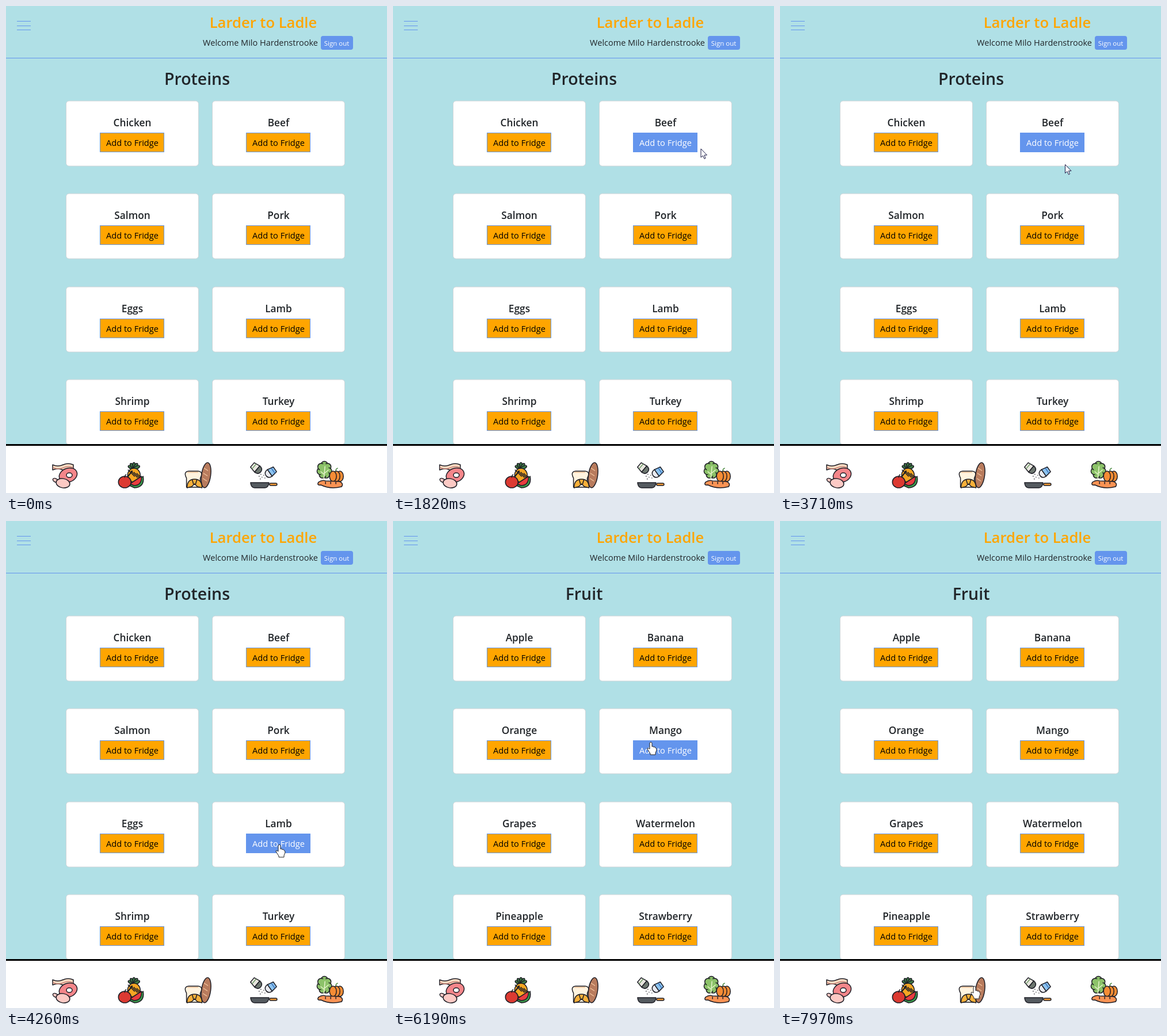
An HTML page for the animation above (8000 ms loop, 662x846 px).

```html
<!DOCTYPE html>
<html lang="en">
<head>
<meta charset="utf-8">
<title>Larder to Ladle</title>
<style>
  html, body { margin: 0; width: 100%; height: 100%; overflow: hidden; background: #b0e0e6; }
  svg { display: block; width: 100%; height: 100%; }
  text { font-family: "Open Sans", "Noto Sans", sans-serif; fill: #212529; }
  .mid { text-anchor: middle; }
  .bold { font-weight: 600; }
  #icons { stroke: #1d1d25; stroke-width: 1.5; stroke-linejoin: round; stroke-linecap: round; }
</style>
</head>
<body>
<svg viewBox="0 0 662 846">
  <rect width="662" height="846" fill="#b0e0e6"/>
  <path d="M19 26.5h24m-24 8h24m-24 7h24M0 90.5h662" stroke="#6495ed"/>
  <text class="mid bold" x="447" y="38" style="font-size:25.6px;fill:#ffa500">Larder to Ladle</text>
  <text x="542" y="69" text-anchor="end" font-size="14.5">Welcome Milo Hardenstrooke</text>
  <rect x="547" y="52" width="56" height="24" rx="4" fill="#6495ed"/>
  <text class="mid" x="574.5" y="68.5" style="font-size:11.5px;fill:#fff">Sign out</text>
  <text id="heading" class="mid bold" x="332" y="137" font-size="28.5"></text>
  <g id="cards"></g>
  <rect y="761" width="662" height="85" fill="#fff"/>
  <rect y="761" width="662" height="3"/>
  <g id="icons"></g>
  <g id="cursor" fill="#fff" stroke-linejoin="round">
    <path id="arrow" d="M.5 0V15l3.5-3 2.5 5.500 2-1-2-5.500H11z" stroke="#191945"/>
    <path id="hand" d="M-2 2q2-4 4 0v6q2-2 3 1 2-2 3 1 2 0 2 4l-2 5v3h-9v-2l-5-8q0-3 4 0z" stroke="#222"/>
  </g>
</svg>
<script>
const LOOP = 8000, SHOW = 390, CLICK = 5100, HOVER_LAG = 70;
const BLUE = "#6495ed", ORANGE = "#ffa500";
const pages = [
  ["Proteins", "Chicken", "Beef", "Salmon", "Pork", "Eggs", "Lamb", "Shrimp", "Turkey"],
  ["Fruit", "Apple", "Banana", "Orange", "Mango", "Grapes", "Watermelon", "Pineapple", "Strawberry"]
];

const $ = id => document.getElementById(id);
function add(parent, tag, attrs, text = "") {
  const el = document.createElementNS("http://www.w3.org/2000/svg", tag);
  for (const k in attrs) el.setAttribute(k, attrs[k]);
  el.textContent = text;
  return parent.appendChild(el);
}

// Cards: two columns, four rows.
const ROW = 161.5, COL = 254, BTN_W = 111, BTN_H = 33;
const cards = pages[0].slice(1).map((_, i) => {
  const left = 104.5 + (i % 2) * COL, top = 165 + Math.floor(Math.floor(i / 2) * ROW);
  const mid = left + 115, x = left + 59, y = top + 55.5, g = $("cards");
  add(g, "rect", { x: left, y: top, width: 230, height: 113, rx: 5, fill: "#fff", stroke: "#cfd5d8" });
  const name = add(g, "text", { class: "mid bold", x: mid, y: top + 43.5, "font-size": 17.3 });
  const box = add(g, "rect", { x, y, width: BTN_W, height: BTN_H, stroke: BLUE });
  const label = add(g, "text", { class: "mid", x: mid, y: y + 22, "font-size": 14.6 }, "Add to Fridge");
  return { name, box, label, x, y };
});

// Footer icons, drawn around their own centres.
const iconX = i => 102 + i * 115.3, ICON_Y = 815;
const group = (parent, x, y, turn = 0) =>
  add(parent, "g", { transform: `translate(${x} ${y}) rotate(${turn})` });
const line = (g, d, stroke = "#1d1d25") => add(g, "path", { d, fill: "none", stroke });
const shape = (g, d, fill) => add(g, "path", { d, fill });
const oval = (g, x, y, rx, ry, fill, turn = 0) =>
  add(group(g, x, y, turn), "ellipse", { rx, ry, fill });
const repeat = (n, draw) => Array.from({ length: n }, (_, i) => draw(i));

function meat(g) {
  shape(g, "M-21-18q9 4 18 0t18 0v9q-9 4-18 0t-18 0z", "#fbdcc3");
  line(g, "M-20-13q9 4 18 0t16 0", "#c98478");
  oval(g, 6, 0, 16, 12, "#f4868a", -20);
  oval(g, 8, 0, 5, 4, "#fff");
  oval(g, -16, 9, 5, 3, "#fcc9c4", 30);
  oval(g, -3, 14, 12, 8, "#fcc9c4", 10);
}

function fruit(g) {
  repeat(5, i => {
    const turn = (i - 2) * 32;
    oval(group(g, 5, -11, turn), 0, -5, 2.5, 6, "#3c7a45");
  });
  oval(g, 5, 0, 11, 12, "#f5a623");
  repeat(4, i => line(g, `M${i * 5 - 5} ${i * 2 - 9}l11 11m${-4 - i * 5} ${-9 - i * 2}l-9 11`));
  shape(g, "M21 2q3 19-15 20l-9-4z", "#3c9a4c");
  shape(g, "M18 2q1 16-13 16l-7-3z", "#e93c3f");
  oval(g, -11, 12, 11, 10, "#dc3a32");
  line(g, "M-11 4q0-3 2-5");
}

function bread(g) {
  oval(g, 15, 0, 8, 22, "#b87b5d", 8);
  repeat(3, i => line(g, `M${12 - i} ${i * 9 - 12}l6 4`, "#f0c19b"));
  shape(g, "M-19 21V5q-6-11 4-12h16q10 1 4 12v16z", "#fff3df");
  line(g, "M-17-5h18", "#e7bc91");
  shape(g, "M-18 22q0-15 13-15t13 15l-8-2-5-5-5 5z", "#f8b03a");
  line(g, "M-9 8l2 7m4 0l2-7");
}

function shaker(g, x, y, turn, glass, band, base) {
  const s = group(g, x, y, turn);
  shape(s, "M-5-9H5L7 2H-7z", glass);
  shape(s, "M-7 2H7q0 8-7 8t-7-8z", base);
  line(s, "M-5-5H5", band);
}

function seasoning(g) {
  shaker(g, -13, -12, -50, "#e8e6df", "#6d9b65", "#6d7770");
  shaker(g, 12, -5, 55, "#8cc3f0", "#3f77bd", "#e8eaf0");
  repeat(7, i => line(g, `M${-10 + i * 5 % 13} ${i * 1.6 - 3}v.1`));
  shape(g, "M-23 13H9q-1 9-7 9h-18q-6 0-7-9z", "#555b60");
  add(g, "rect", { x: 10, y: 14, width: 13, height: 4, rx: 2, fill: "#f39a35" });
}

function veg(g) {
  repeat(7, i => {
    const a = i / 7 * 2 * Math.PI;
    oval(g, -10 + 7 * Math.sin(a), -9 - 9 * Math.cos(a), 6, 6, "#8cc269");
  });
  add(g, "ellipse", { cx: -10, cy: -9, rx: 8, ry: 11, fill: "#8cc269", stroke: "none" });
  line(g, "M-11 7l2-22m-1 14l-6-5m7 2l6-5", "#e6f4cb");
  line(g, "M10-5q-1-6 3-7", "#4d8b45");
  repeat(3, i => oval(g, 17 - i * 6, 2, 6, 9, "#f58c35"));
  shape(g, "M-20 12q6-4 12-2l24 1q8 3 4 9-20 5-36-3-8 1-4-5z", "#fa9354");
  repeat(3, i => line(g, `M${i * 9 - 8} 12v3`));
}

[meat, fruit, bread, seasoning, veg].forEach((draw, i) => draw(group($("icons"), iconX(i), ICON_Y)));

// Pointer trips; bend bows the path sideways by a share of its length.
const trips = [
  { start: 390, end: 1150, x: 240, y: 237, bend: .25 },
  { start: 1420, end: 1490, x: 233, y: 225 },
  { start: 1610, end: 1820, x: 534.5, y: 248 },
  { start: 2020, end: 2690, x: 242, y: 405, bend: -.06 },
  { start: 2840, end: 3100, x: 556, y: 246 },
  { start: 3100, end: 3250, x: 498, y: 232 },
  { start: 3640, end: 4180, x: 475, y: 562 },
  { start: 4460, end: 5020, x: 219, y: 816, bend: -.2 },
  { start: 5190, end: 5300, x: 228, y: 742 },
  { start: 5300, end: 5740, x: 263, y: 233 },
  { start: 5800, end: 6120, x: 448, y: 384 },
  { start: 6320, end: 6700, x: 232, y: 393 },
  { start: 6770, end: 7150, x: 240, y: 574 },
  { start: 7150, end: 7970, x: 338, y: 808 }
];

function pointerAt(t) {
  let x = 500, y = 770;
  for (const trip of trips) {
    if (t < trip.start) break;
    const p = Math.min(1, (t - trip.start) / (trip.end - trip.start));
    const dx = trip.x - x, dy = trip.y - y, bow = (trip.bend || 0) * 4 * p * (1 - p);
    x += dx * p + dy * bow;
    y += dy * p - dx * bow;
  }
  return { x, y };
}

const onButton = (c, { x, y }) =>
  y < 760 && x >= c.x && x <= c.x + BTN_W && y >= c.y && y <= c.y + BTN_H;
const onIcon = ({ x, y }) =>
  Math.abs(y - ICON_Y) < 25 && [0, 1, 2, 3, 4].some(i => Math.abs(x - iconX(i)) < 25);
const show = (id, on) => { $(id).style.display = on ? "" : "none"; };

function render(t) {
  const page = pages[t < CLICK ? 0 : 1];
  const pos = pointerAt(t), hover = pointerAt(t - HOVER_LAG);
  $("heading").textContent = page[0];
  cards.forEach((c, i) => {
    const lit = t >= SHOW && onButton(c, hover);
    c.name.textContent = page[i + 1];
    c.box.setAttribute("fill", lit ? BLUE : ORANGE);
    c.label.style.fill = lit ? "#fff" : "#000";
  });
  const link = onIcon(pos) || cards.some(c => onButton(c, pos));
  $("cursor").setAttribute("transform", `translate(${pos.x} ${pos.y})`);
  show("cursor", t >= SHOW);
  show("hand", link);
  show("arrow", !link);
}

const begin = performance.now();
function tick() {
  render((performance.now() - begin) % LOOP);
  requestAnimationFrame(tick);
}
tick();
</script>
</body>
</html>
```
